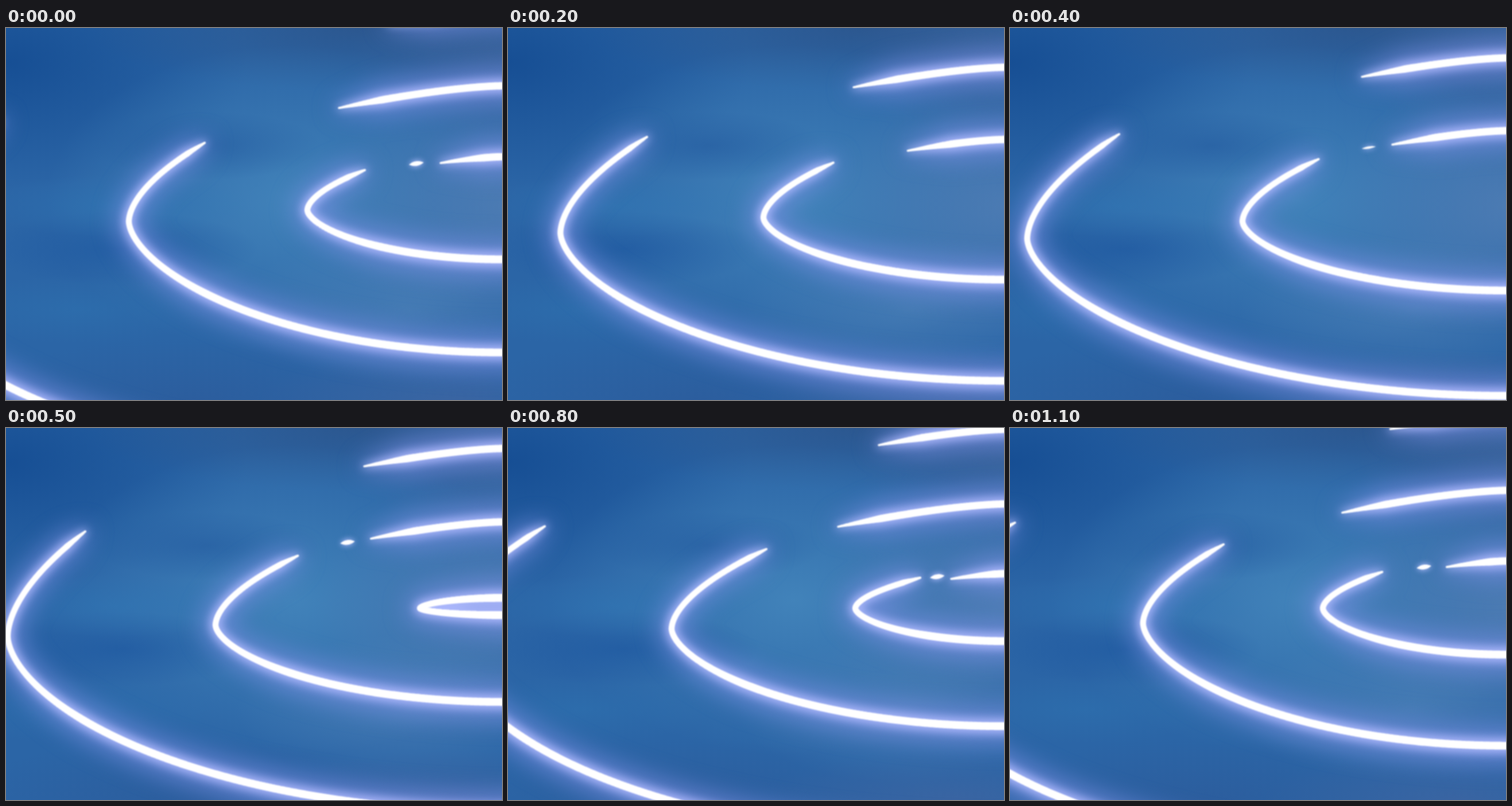
These frames come from a looping animation (864x648 px, 1.2 s). An HTML page with a canvas:

```html
<!DOCTYPE html>
<html lang="en">
<head>
<meta charset="utf-8">
<title>Light rings</title>
<style>
  html, body { margin: 0; width: 100%; height: 100%; overflow: hidden; background: #2a64a4; }
  canvas { display: block; }
</style>
</head>
<body>
<canvas id="stage" width="864" height="648"></canvas>
<script>
const W = 864, H = 648, STEP = 100, STEPS = 12;
const SKIPS = [1, 2, 5, 8];              // steps that advance the rings twice
const PERIOD = STEPS + SKIPS.length;     // age between one ring and the next
const BIRTH = 8;
const ctx = document.getElementById('stage').getContext('2d');

const mix = (a, b, k) => a + (b - a) * k;
const clamp = v => Math.max(0, Math.min(1, v));

// Straight runs between a few [age, value] points
function track(n, ...points) {
  const i = points.findIndex(p => p[0] >= n);
  if (i < 1) return points.at(i)[1];
  const [a, va] = points[i - 1], [b, vb] = points[i];
  return mix(va, vb, (n - a) / (b - a));
}

// Shape of a ring at age n: leftmost point, left tip, start of the upper arc, heights at the right edge
function ringAt(n) {
  const young = Math.max(0, 1 - n / 2);
  const top = 283 - 7.2 * n - 0.0165 * n * n + 13 * young;
  const upX = track(n, [4, 772], [8, 757], [20, 575], [24, 580], [40, 668]);
  return {
    n, top, upX,
    upY: top + (W - upX) ** 1.3 / 40,
    bottom: 343 + 6.62 * n + 0.11 * n * n - 17 * young,
    x: 3 + track(n, [0, 718], [2, 642], [20, 282], [24, 211], [30, 27], [32, 0], [40, -220]),
    y: track(n, [7, 314], [19, 353], [24, 337], [30, 367], [40, 345]),
    tipX: track(n, [4, 718], [8, 625], [20, 450], [32, 138], [40, -10]),
    tipY: 275 - 3.6 * n + 0.02 * n * n
  };
}

const trace = (count, point) => Array.from({ length: count + 1 }, (_, i) => point(i / count));

// [x, y, radius] along the strokes of one ring
function lineDots({ n, x: x0, y: y0, top, bottom, tipX, tipY, upX, upY }) {
  const bend = 0.6 - 0.15 * clamp((n - 31) / 8);
  const sweep = edge => trace(450, s => {
    const x = mix(x0, W + 50, s * s), u = (x - x0) / (W - x0);
    const v = (1 - (1 - u) ** 2) ** bend;
    return [x, mix(y0, edge, v), mix(5.2, 6.8, clamp((x - x0) / 130))];
  });
  if (n < 4) return [...sweep(bottom), ...sweep(top)];

  const hook = trace(160, s => {
    const u = s * s, x = mix(x0, tipX, u);
    return [x, mix(y0, tipY, u ** 0.57), 5.2 * Math.min(1, 0.4 + (tipX - x) / 50)];
  });
  const upper = trace(200, s => {
    const x = mix(upX, W + 50, s), u = (x - upX) / (W - upX);
    return [x, mix(top, upY, Math.abs(1 - u) ** 1.5 * Math.sign(1 - u)),
      mix(1.8, 6.4, clamp((x - upX) / 75))];
  });
  return [...sweep(bottom), ...hook, ...upper];
}

// Loose spark in the gap between the left tip and the upper arc
function sparkDots({ n, tipX, tipY, upX, upY }) {
  const r = n < 10 ? 4 : n - 12;
  if (n < 4 || n > 16 || r <= 0) return [];
  const k = 0.55 + 0.13 * clamp((n - 4) / 4);
  const x = mix(tipX, upX, k), y = mix(tipY, upY, k) - 3;
  return trace(30, s => [x + 26 * (s - 0.5), y - 4 * (s - 0.5), r * Math.sin(Math.PI * s)]);
}

function blob(x, y, rx, ry, rgb, alpha) {
  ctx.save();
  ctx.translate(x, y);
  ctx.scale(rx, ry);
  const g = ctx.createRadialGradient(0, 0, 0, 0, 0, 1);
  g.addColorStop(0, `rgba(${rgb},${alpha})`);
  g.addColorStop(0.5, `rgba(${rgb},${alpha * 0.5})`);
  g.addColorStop(1, `rgba(${rgb},0)`);
  ctx.fillStyle = g;
  ctx.fillRect(-1, -1, 2, 2);
  ctx.restore();
}

function sky() {
  ctx.fillStyle = '#2b65a6';
  ctx.fillRect(0, 0, W, H);
  blob(0, 60, 420, 220, '20,76,146', 0.9);
  blob(620, 0, 480, 110, '44,84,138', 0.8);
  blob(880, 50, 280, 150, '66,100,155', 0.6);
  blob(500, 300, 430, 270, '68,134,188', 0.9);
  blob(880, 310, 340, 230, '84,128,182', 0.8);
  blob(700, 490, 300, 130, '88,138,190', 0.5);
  blob(350, 205, 200, 60, '36,92,160', 0.65);
  blob(200, 385, 240, 65, '30,88,160', 0.7);
  blob(190, 310, 240, 55, '48,120,182', 0.45);
  blob(130, 490, 240, 60, '46,114,176', 0.55);
  blob(330, 650, 420, 110, '44,90,154', 0.7);
  blob(780, 650, 340, 90, '64,100,160', 0.7);
}

function paint(dots, scale, blur, color) {
  const path = new Path2D();
  for (const [x, y, r] of dots) {
    path.moveTo(x + r * scale, y);
    path.arc(x, y, r * scale, 0, 7);
  }
  ctx.filter = `blur(${blur}px)`;
  ctx.fillStyle = color;
  ctx.fill(path);
  ctx.filter = 'none';
}

function draw(step) {
  const phase = step + SKIPS.filter(s => s <= step).length;
  const age = (phase - BIRTH + PERIOD) % PERIOD;
  const rings = [0, 1, 2].map(k => age + k * PERIOD).filter(n => n <= 40).map(ringAt);
  const lines = rings.flatMap(lineDots), sparks = rings.flatMap(sparkDots);
  sky();
  paint(lines, 4.5, 20, 'rgba(126,146,230,.66)');
  paint(lines, 1.9, 8, 'rgba(178,188,255,.9)');
  paint(sparks, 1.6, 5, 'rgba(178,188,255,.8)');
  paint([...lines, ...sparks], 1, 1.2, '#fff');
}

let shown = -1;
const start = performance.now();
function tick() {
  const step = Math.floor((performance.now() - start) / STEP) % STEPS;
  if (step !== shown) draw(shown = step);
  requestAnimationFrame(tick);
}
tick();
</script>
</body>
</html>
```
